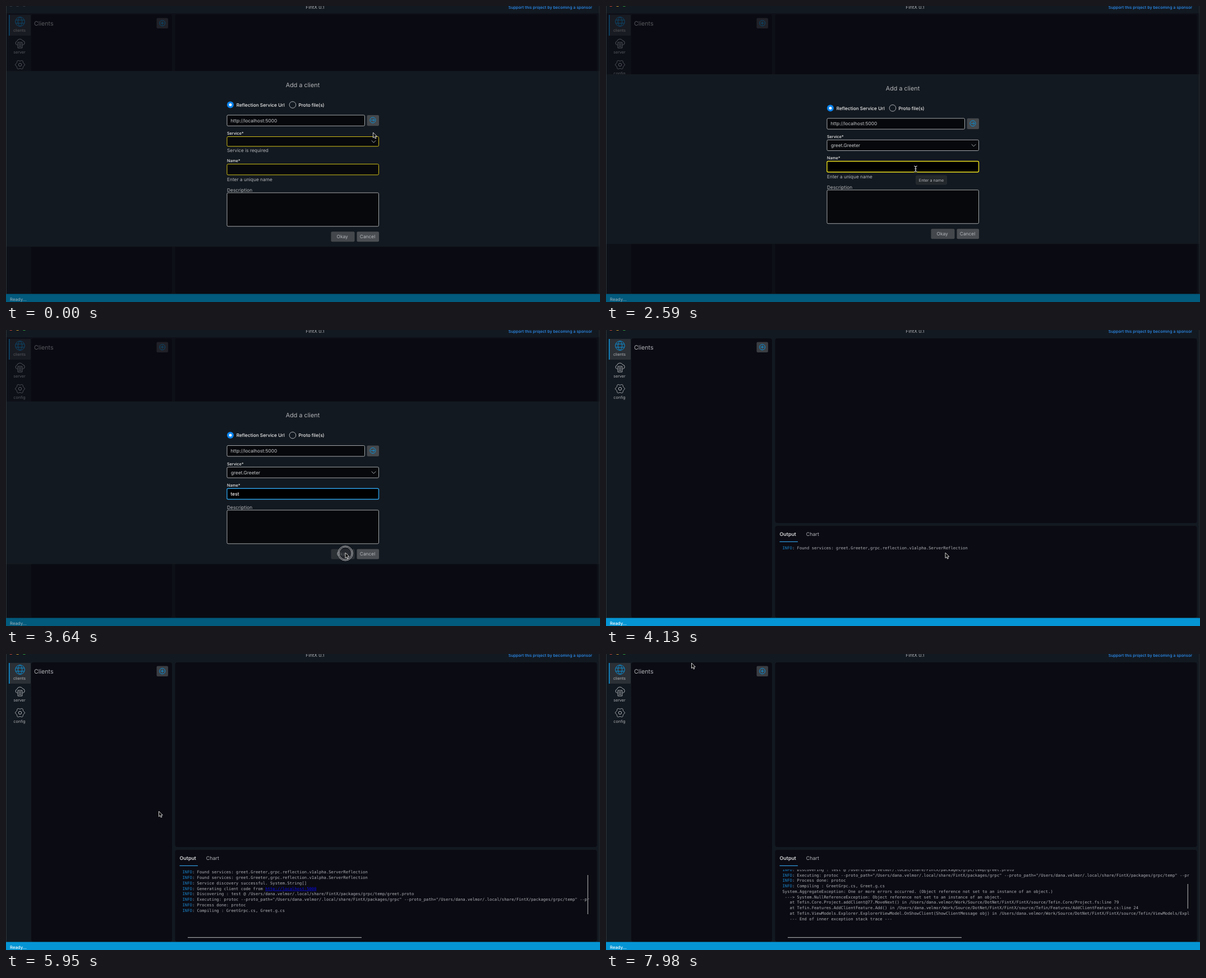
An HTML page that plays this animation: 1059x529 px, repeating every 8000 ms.

```html
<!DOCTYPE html>
<html lang="en">
<head>
<meta charset="utf-8">
<title>Add a client</title>
<style>
  html, body { margin: 0; width: 100%; height: 100%; overflow: hidden; background: #131920; }
  svg { display: block; width: 100%; height: 100%; }
  text { font-family: Inter, sans-serif; white-space: pre; text-rendering: geometricPrecision; }
  .log text { font: 7.23px "DejaVu Sans Mono", monospace; fill: #adb1b5; }
  .log .tag { fill: #1a86cc; }
  .log .link { fill: #0808ee; text-decoration: underline; }
</style>
</head>
<body>
<svg id="stage" viewBox="0 0 1059 529"></svg>
<script>
const LOOP = 8000, STEP = 70;
const BLUE = '#0c8fd6', GREY = '#8b9197', ICON = '#a9aeb3', TEXT = '#b2b5b9', BRIGHT = '#eceded';
const YELLOW = '#cdbb16', PANEL = '#0b0b13';
const stage = document.getElementById('stage');

const rect = (x, y, x2, y2, fill, stroke = 'none', width = 1, r = 2) =>
  `<rect x="${x}" y="${y}" width="${x2 - x}" height="${y2 - y}" rx="${r}" fill="${fill}" stroke="${stroke}" stroke-width="${width}"/>`;
const bar = (x, y, x2, y2, fill) => rect(x, y, x2, y2, fill, 'none', 0, 0);
const circle = (x, y, r, fill, stroke = 'none', width = 1) =>
  `<circle cx="${x}" cy="${y}" r="${r}" fill="${fill}" stroke="${stroke}" stroke-width="${width}"/>`;
const path = (x, y, d, stroke, width = 1, fill = 'none') =>
  `<path transform="translate(${x} ${y})" d="${d}" fill="${fill}" stroke="${stroke}" stroke-width="${width}" stroke-linejoin="round"/>`;
// y is the visual middle of the line of text
const label = (x, y, str, size = 8.35, fill = TEXT, anchor = 'start', weight = 400) =>
  `<text x="${x}" y="${y + size * 0.35}" font-size="${size}" fill="${fill}" text-anchor="${anchor}" font-weight="${weight}">${str}</text>`;

// Mouse track: time, x, y of the hot spot
const track = [
  [0, 654.5, 226], [210, 653, 219], [350, 651.5, 212], [1120, 651.5, 212], [1470, 640, 240],
  [1960, 552, 291], [3080, 552, 291], [3500, 605, 398], [4760, 605, 398], [4900, 581, 394],
  [5110, 581, 394], [5250, 573, 402], [5740, 253, 265], [5880, 253, 265], [5950, 272.5, 281],
  [6230, 463, 425], [6720, 161, 205], [6860, 125, 150], [6930, 110, 112], [7000, 155, 87],
  [7070, 155, 87], [7210, 168, 130], [7280, 160, 146], [7350, 151, 122], [7560, 151, 122],
  [7700, 138, 70], [7840, 152.5, 16], [8000, 152.5, 16]
];
function mouseAt(t) {
  const i = track.findIndex(k => k[0] > t);
  const [t0, x0, y0] = track[i - 1], [t1, x1, y1] = track[i];
  const p = (t - t0) / (t1 - t0);
  return [x0 + (x1 - x0) * p, y0 + (y1 - y0) * p];
}

const home = '/Users/dana.velmor';
const share = home + '/.local/share/FintX/packages/grpc';
const source = home + '/Work/Source/DotNet/FintX/FintX/source';
const found = 'INFO: Found services: greet.Greeter,grpc.reflection.v1alpha.ServerReflection';
const logLines = [
  found, found,
  'INFO: Service discovery successful. System.String[]',
  'INFO: Generating client code from http://localhost:5000',
  `INFO: Discovering : test @ ${share}/temp/greet.proto`,
  `INFO: Executing: protoc --proto_path="${share}" --proto_path="${share}/temp" --proto_path`,
  'INFO: Process done: protoc',
  'INFO: Compiling : GreetGrpc.cs, Greet.g.cs',
  'System.AggregateException: One or more errors occurred. (Object reference not set to an instance of an object.)',
  ' ---> System.NullReferenceException: Object reference not set to an instance of an object.',
  `   at Tefin.Core.Project.addClient@77.MoveNext() in ${source}/Tefin.Core/Project.fs:line 79`,
  `   at Tefin.Features.AddClientFeature.Add() in ${source}/Tefin/Features/AddClientFeature.cs:line 24`,
  `   at Tefin.ViewModels.Explorer.ExplorerViewModel.OnShowClient(ShowClientMessage obj) in ${source}/Tefin/ViewModels/Explorer`,
  '   --- End of inner exception stack trace ---'
];

function logView(t) {
  const failed = t >= 7980;
  const count = failed ? 14 : t >= 4340 ? 8 : t >= 4270 ? 6 : t >= 4200 ? 3 : 1;
  const scroll = failed ? 43.6 : 0;
  const lines = logLines.slice(0, count).map((line, i) => {
    const marked = line.replace(/>/g, '&gt;')
      .replace(/^INFO/, '<tspan class="tag">INFO</tspan>')
      .replace(/http:\S+/, '<tspan class="link">$&</tspan>');
    return `<text x="314.5" y="${392.4 + i * 9.76 - scroll}">${marked}</text>`;
  }).join('');
  const thumb = failed ? [411, 455] : [395, 465];
  const bars = count < 8 ? '' :
    bar(324, 506, 634, 507.2, '#a0a2a4') + bar(1036.7, thumb[0], 1037.9, thumb[1], '#a0a2a4');
  return `<clipPath id="view"><rect x="310" y="385" width="729.5" height="118"/></clipPath>
    <g class="log" clip-path="url(#view)">${lines}</g>${bars}`;
}

function gear() {
  const points = Array.from({ length: 60 }, (_, i) => {
    const a = i * Math.PI / 30, r = 7.5 + 0.9 * Math.cos(6 * a);
    return `${(r * Math.cos(a)).toFixed(2)} ${(r * Math.sin(a)).toFixed(2)}`;
  });
  return path(25, 105, `M${points.join('L')}Z`, ICON) + circle(25, 105, 2.7, 'none', ICON);
}

function shell(active) {
  const lights = ['#d9453c', '#d9a52c', '#2fae43'].map((c, i) =>
    circle(8.8 + i * 11.8, -2.1, 3.2, active ? c : '#3a3f45')).join('');
  return bar(0, 0, 1059, 529, '#131920') + lights +
    label(551, 2.3, 'FintX 0.1', 8.35, TEXT, 'middle') +
    label(1045, 2, 'Support this project by becoming a sponsor', 7.15, '#2d90f5', 'end', 500) +
    rect(45, 15, 296, 514, PANEL, 'none', 0, 4) +
    rect(301.5, 15, 1053.5, 345, PANEL, 'none', 0, 4) +
    rect(301.5, 350, 1053.5, 514, PANEL, 'none', 0, 4) +
    rect(5, 16, 44, 53, '#2b3036', 'none', 0, 1) + bar(5, 16, 6.6, 53, BLUE) +
    circle(25, 28, 8.3, 'none', BLUE) +
    path(25, 28, 'M-7.8-2.9H7.8M-7.8 2.9H7.8M0-8.3C-5-4.5-5 4.5 0 8.3C5 4.5 5-4.5 0-8.3', BLUE) +
    path(25, 67, 'M-4.5 2.5H-5.5A3.4 3.4 0 0 1-5.5-4A5.6 5.6 0 0 1 4.8-5A3.8 3.8 0 0 1 5.3 2.5H4.5M-3.8-2H3.8V8H-3.8ZM-2 .7H2M-2 3H2M-2 5.4H2', ICON) +
    gear() +
    label(24, 43, 'clients', 7.15, TEXT, 'middle') + label(24, 82, 'server', 7.15, ICON, 'middle') +
    label(24, 120, 'config', 7.15, ICON, 'middle') +
    label(50, 31, 'Clients', 10.7) +
    rect(268.5, 21.5, 289, 40, '#3a3e43') + circle(278.7, 30.6, 5, 'none', BLUE) +
    path(278.7, 30.6, 'M-3 0H3M0-3V3', BLUE);
}

function outputPanel(t) {
  return label(309.5, 365, 'Output', 8.9, '#d4d6d8', 'start', 600) + label(356.8, 365, 'Chart', 8.9) +
    bar(309.5, 377.8, 342, 379, '#2f9be0') + logView(t);
}

function dialog(t) {
  const hasService = t >= 700, named = t >= 2730;
  const focused = t >= 2100 && t < 3780, hover = t >= 1820 && t < 3220;
  const top = named ? 127.7 : hasService ? 122 : 116.2;
  const title = top + 24.8, url = title + 54, service = title + 92.5;
  const serviceEnd = service + (hasService ? 19.2 : 17.3);
  const name = serviceEnd + (hasService ? 19 : 31.7), nameEnd = name + 19.3;
  const desc = nameEnd + (named ? 14.4 : 27), area = desc + 5, areaEnd = area + 60;
  const okay = areaEnd + 9.5, bottom = okay + 27;
  const field = '#06080b', line = '#a3a6a9';
  const typed = 'test'.slice(0, [2730, 2870, 2940, 3080].filter(k => t >= k).length);
  const caret = focused && (t < 2590 || named && t < 3500);
  const caretX = 400.5 + typed.length * 4.1;
  const pressed = t >= 3430;
  const nameStroke = focused ? (named ? '#2b9be0' : '#eade1c') : named ? line : YELLOW;

  return bar(0, 13, 1059, 515, 'rgba(11,11,18,.54)') +
    bar(0, top, 1059, bottom, '#131920') +
    label(529, title, 'Add a client', 10.8, TEXT, 'middle') +
    circle(400, title + 35.6, 6, '#0b84ee') + circle(400, title + 35.6, 2.5, '#fff') +
    label(410.7, title + 35.8, 'Reflection Service Url', 8.3, BRIGHT, 'start', 500) +
    circle(511, title + 35.6, 5.8, 'none', ICON) +
    label(521.5, title + 35.8, 'Proto file(s)', 8.3, BRIGHT, 'start', 500) +
    rect(394, url, 639.5, url + 19.3, field, line) +
    label(400.5, url + 9.7, 'http://localhost:5000', 8.35, '#c8cacc') +
    rect(643.5, url, 665, url + 19.3, t >= 280 && t < 1190 ? '#2a2f35' : '#44484c') +
    circle(654, url + 9, 5, 'none', BLUE) + path(654, url + 9, 'M-3 0H3M.6-2.4L3 0L.6 2.4', BLUE) +
    label(394, title + 86.8, 'Service*', 7.15, BRIGHT, 'start', 500) +
    rect(394, service, 664.5, serviceEnd, field, hasService ? line : YELLOW) +
    path(655.5, (service + serviceEnd) / 2, 'M-3.8-1.8L0 2L3.8-1.8', ICON) +
    (hasService ? label(401, service + 9.7, 'greet.Greeter', 8.35, '#c8cacc') : label(394, serviceEnd + 7.6, 'Service is required')) +
    label(394, name - 5.6, 'Name*', 7.15, BRIGHT, 'start', 500) +
    rect(394, name, 664.5, nameEnd, focused || hover ? '#000' : field, nameStroke, focused ? 1.4 : 1) +
    label(400.5, name + 9.8, typed, 8.35, '#fff', 'start', 500) +
    (caret ? bar(caretX, name + 4.5, caretX + 0.8, name + 14.8, '#ddd') : '') +
    (named ? '' : label(394, nameEnd + 8, 'Enter a unique name')) +
    label(394, desc, 'Description') +
    rect(394, area, 664.5, areaEnd, field, line) +
    rect(579.5, okay, 621.5, okay + 18, pressed ? '#2c3136' : '#44484c') +
    label(599.7, okay + 9, 'Okay', 8.35, pressed ? '#85898c' : TEXT, 'middle') +
    rect(625.5, okay, 665, okay + 18, '#4b4f53') + label(644.5, okay + 9, 'Cancel', 8.35, TEXT, 'middle');
}

function tooltip(x, y, width, str) {
  return rect(x, y, x + width, y + 16, '#23282d', '#2d3237', 0.6) +
    label(x + width / 2, y + 8, str, 7.15, TEXT, 'middle');
}

function pointer(t) {
  const [x, y] = mouseAt(t);
  const clicking = [[350, 560], [2100, 2240], [3570, 3780]].some(([a, b]) => t >= a && t < b);
  const ring = clicking
    ? circle(x, y + 1, 13.2, 'rgba(30,34,39,.45)', '#c4c6c8', 0.9) + circle(x, y + 1, 11.2, 'none', '#c4c6c8', 0.9)
    : '';
  const beam = 'M-2.8-5Q0-5 0-3Q0-5 2.8-5M0-3.5V3.5M-2.8 5Q0 5 0 3Q0 5 2.8 5M-1.6 0H1.6';
  const arrow = 'M0 0V9.6L2.2 7.6L3.7 11L5.4 10.3L3.9 7H6.8Z';
  const shape = t >= 1820 && t < 3220
    ? path(x, y, beam, '#000', 2.2) + path(x, y, beam, '#eee', 1)
    : path(x, y, arrow, '#e8e8e8', 0.9, '#0a0a0a');
  return ring + shape;
}

function scene(t) {
  const open = t < 4130;
  return shell(t >= 350) +
    (open ? dialog(t) : outputPanel(t)) +
    bar(0, 514.6, 1059, 529, open ? '#025a7d' : '#0595d4') +
    label(7, 524, 'Ready...', 7.7, open ? '#8fa9b5' : '#fff', 'start', 500) +
    bar(0, 0, 0.8, 515, '#353b41') + bar(1057.4, 0, 1058.2, 515, '#2a3036') +
    (t >= 910 && t < 1190 ? tooltip(652, 224.7, 70, 'Discover services') : '') +
    (t >= 2240 && t < 2730 ? tooltip(552.5, 303, 55, 'Enter a name') : '') +
    pointer(t);
}

let shown = -1;
function tick() {
  const t = Math.floor(performance.now() % LOOP / STEP) * STEP;
  if (t !== shown) stage.innerHTML = scene(shown = t);
  requestAnimationFrame(tick);
}
tick();
</script>
</body>
</html>
```
